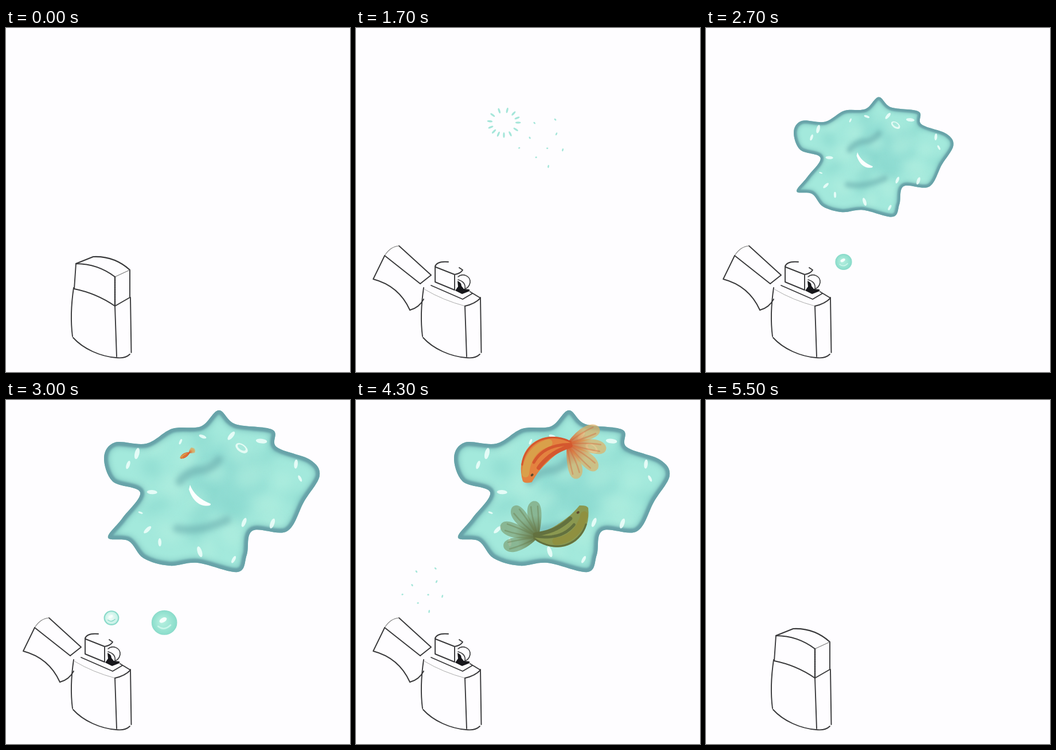
These frames come from a looping animation (600x600 px, 5700 ms). An HTML page with a canvas:

```html
<!DOCTYPE html>
<html lang="en">
<head>
<meta charset="utf-8">
<title>Lighter and fish</title>
<style>
html, body { margin: 0; width: 100%; height: 100%; overflow: hidden; background: #fefdff; }
canvas { display: block; width: 100vmin; height: 100vmin; }
</style>
</head>
<body>
<canvas id="stage" width="600" height="600"></canvas>
<script>
const ctx = document.getElementById('stage').getContext('2d');
const LOOP = 5700, TAU = Math.PI * 2, RAD = Math.PI / 180;
const PAPER = '#fefdff', INK = '#39393b', MINT = '#a5e6da';

const mix = (a, b, q) => a + (b - a) * q;
const clamp = v => Math.max(0, Math.min(1, v));

// Pictures change six times a second, snapped to tenths.
const frameAt = ms => Math.floor(Math.floor(ms / 100) * .6 + .2);
const timeOf = frame => Math.round(frame * 5 / 3) * 100;

function seeded(seed) {
  return () => (seed = seed * 16807 % 2147483647) / 2147483647;
}

function line(d, width = 1.9, color = INK) {
  ctx.strokeStyle = color;
  ctx.lineWidth = width;
  ctx.stroke(new Path2D(d));
}

function shape(d, color) {
  ctx.fillStyle = color;
  ctx.fill(new Path2D(d));
}

function oval(x, y, rx, ry, rot, color) {
  ctx.beginPath();
  ctx.ellipse(x, y, rx, ry, rot, 0, TAU);
  ctx.fillStyle = color;
  ctx.fill();
}

// ---- lighter ----
const HINGE = [118, 472], SWING = 55 * RAD;
// Lid corners: shut x, y, then open x, y.
const LID = {
  A: [122, 411, 30, 438], B: [152, 399, 60, 381], C: [216, 422, 75, 380], D: [190, 434, 50, 397],
  E: [190, 485, 112, 446], F: [119, 455, 94, 492], G: [216, 470, 131, 431]
};

function spin(x, y, a) {
  const c = Math.cos(a), s = Math.sin(a);
  return [x * c - y * s, x * s + y * c];
}

function lidPoint([x, y, openX, openY], q) {
  const [hx, hy] = HINGE;
  const [rx, ry] = spin(openX - hx, openY - hy, SWING);
  const p = spin(mix(x - hx, rx, q), mix(y - hy, ry, q), -SWING * q);
  return [p[0] + hx, p[1] + hy];
}

// Quadratic segment from a to b, bowed sideways.
function bow(a, b, bulge) {
  const dx = b[0] - a[0], dy = b[1] - a[1], k = 2 * bulge / Math.hypot(dx, dy);
  return `Q${(a[0] + b[0]) / 2 + dy * k} ${(a[1] + b[1]) / 2 - dx * k} ${b}`;
}

function lid(q) {
  const [A, B, C, D, E, F, G] = Object.values(LID).map(p => lidPoint(p, q));
  const top = bow(A, D, 6 * (1 - q)), left = bow(F, A, -10 * q), seam = bow(E, F, -4);
  const back = bow(B, C, mix(7, 1, q));
  shape(`M${A}${top}L${E}${seam}${left}`, PAPER);
  shape(`M${D}L${C}L${G}L${E}Z`, PAPER);
  shape(`M${A}L${B}${back}L${D}Z`, PAPER);
  line(`M${F}${left}${top}`);
  line(`M${C}L${G}L${E}`);
  if (q < 1) line(`M${E}${seam}`);
  if (q < .5) line(`M${A}L${B}${back}`, 2.2);
  line(q < .5 ? `M${D}L${C}` : `M${D}Q${B} ${C}`, 1.1, '#777');
  ctx.setLineDash(q ? [] : [3, 1.2]);
  line(`M${D}L${E}`, q ? 1.9 : 2.4);
  ctx.setLineDash([]);
}

function lighter(q) {
  line('M190 485L193 573M217 470L218.500 566');
  line('M117 540C135 560 165 573 192 575Q208 577 216 569');
  line('M118 453Q111 500 116 538');
  if (q) {
    line('M120 456Q152 475 190 485', 1, '#aaa');
    line('M131 449L186 473L203 463M190 485Q208 481 217 471L199 460');
  }
  if (q > .3) {
    line('M138 416C140 409 150 407 161 408M138 415V443L172 457V430L139 417M172 430Q183 428 186 422L180 418');
    line('M178 434C186 427 200 432 199 444Q197 453 190 455Q192 443 178 439', 1.6);
    shape('M177 441Q184 444 184 450L188 455L198 456V459L185 464L173 458L178 451Z', '#17171b');
  }
  lid(q);
  if (q === 1) line('M94 492Q110 488 118 473');
}

const lidAt = t => t < 4500 ? clamp(t / 700) : Math.min(.72, (5500 - t) / 1000 * (t < 5500));

// ---- water cloud ----
const MIDDLE = [359, 159];
const EDGE = [
  [171, 100], [190, 74], [245, 76], [290, 50], [340, 46], [371, 18], [400, 42], [465, 52],
  [472, 82], [530, 104], [547, 132], [520, 177], [490, 229], [430, 228], [420, 270], [404, 300],
  [334, 284], [285, 289], [240, 276], [214, 246], [178, 240], [203, 206], [234, 161], [186, 142]
];

// Smooth closed curve through all points.
function loopThrough(pts) {
  const n = pts.length, p = new Path2D(), get = i => pts[(i + n) % n];
  p.moveTo(...pts[0]);
  for (let i = 0; i < n; i++) {
    const [a, b, c, d] = [get(i - 1), get(i), get(i + 1), get(i + 2)];
    p.bezierCurveTo(b[0] + (c[0] - a[0]) / 6, b[1] + (c[1] - a[1]) / 6,
      c[0] - (d[0] - b[0]) / 6, c[1] - (d[1] - b[1]) / 6, ...c);
  }
  p.closePath();
  return p;
}
const edge = loopThrough(EDGE);

function rim(width, color) {
  ctx.strokeStyle = color;
  ctx.lineWidth = width;
  ctx.stroke(edge);
}

function cloud(t) {
  const k = Math.pow(clamp((t - 1950) / 850), 2.4);
  const rnd = seeded(77);
  const soft = px => { ctx.filter = `blur(${(px * k).toFixed(2)}px)`; };
  const [mx, my] = MIDDLE;
  ctx.save();
  ctx.translate(mix(175, mx, Math.pow(k, 1.5)), mix(413, my, k));
  ctx.scale(k, k);
  ctx.translate(-mx, -my);
  ctx.clip(edge);
  ctx.fillStyle = k < .2 ? '#7fd6c2' : '#a3e9dc';
  ctx.fill(edge);

  // Mottled water, lighter toward the rim.
  soft(9);
  oval(385, 140, 70, 60, .4, '#92ded4');
  for (let i = 0; i < 22; i++) {
    const a = i * 2.4, d = Math.sqrt(i / 22);
    oval(mx + 165 * d * Math.cos(a), my + 110 * d * Math.sin(a),
      15 + 22 * rnd(), 10 + 12 * rnd(), a, i % 3 ? '#b4f0e080' : '#85d6cc80');
  }
  soft(5);
  line('M303 142Q318 122 345 122Q362 116 371 104', 15, '#67a9ab90');
  line('M298 224Q335 232 386 209', 14, '#67a9ab88');
  rim(18, '#68abad90');
  soft(1.5);
  rim(k < .2 ? 22 : 14, '#68a3a9');

  soft(.7);
  EDGE.forEach(([x, y], i) => {
    const d = .76 + .1 * rnd(), size = 4 + 6 * rnd();
    if (i % 3 < 2) oval(mix(mx, x, d), mix(my, y, d), size, size * .4, rnd() * 3, '#f1fffbd8');
  });
  if (t < 4000) shape('M321 148Q329 170 357 181Q358 186 344 184Q327 180 319 156Z', '#fbfffe');
  oval(411, 84, 12, 7, .6, '#e4fbf4');
  oval(411, 83, 8, 4, .6, '#a8e9dc');
  ctx.restore();
}

// ---- fish ----
const ORANGE = { body: '#e3823f', edge: '#d4582f', belly: '#d9a04a', tail: '#e0b062b0' };
const GREEN = { body: '#8a9850', edge: '#63713f', belly: '#8f9040', tail: '#7fa378b8' };

// Each circles the middle while growing; push and turn bend the path halfway.
const FISH = [
  { colors: ORANGE, start: 3000, from: 239, sweep: -352, push: -25, turn: 0, size: 18 },
  { colors: GREEN, start: 3300, from: 61, sweep: -344, push: 21, turn: -45, size: 24 }
];

function swim({ colors, start, from, sweep, push, turn, size }, t) {
  const p = (t - start) / (4300 - start);
  if (p < 0 || p > 1) return;
  const q = Math.pow(p, 1.5), wave = Math.sin(Math.PI * p);
  const angle = from + sweep * q, radius = 74 + push * wave;
  ctx.save();
  ctx.translate(350 + radius * Math.cos(angle * RAD), 160 + radius * Math.sin(angle * RAD));
  ctx.rotate((angle - 90 + turn * wave - 18 * q) * RAD);
  const s = mix(size, 100, q);
  ctx.scale(s, s);
  ctx.filter = `blur(${s / 130}px)`;
  fish(colors, .47 * q * q);
  ctx.restore();
}

function fin(c, x, y, a, len, wide) {
  ctx.save();
  ctx.translate(x, y);
  ctx.rotate(a);
  const g = ctx.createLinearGradient(0, 0, len, 0);
  g.addColorStop(0, c.edge);
  g.addColorStop(.6, c.tail);
  ctx.fillStyle = g;
  ctx.beginPath();
  ctx.moveTo(0, 0);
  ctx.bezierCurveTo(len * .4, -wide, len * .9, -wide * 1.3, len, -wide * .3);
  ctx.bezierCurveTo(len * 1.05, wide * .9, len * .5, wide * .6, 0, 0);
  ctx.fill();
  ctx.globalAlpha = .35;
  for (const k of [-.5, .2]) {
    ctx.beginPath();
    ctx.moveTo(0, 0);
    ctx.quadraticCurveTo(len * .5, wide * k, len * .85, wide * k);
    ctx.strokeStyle = c.edge;
    ctx.lineWidth = .025;
    ctx.stroke();
  }
  ctx.restore();
}

// Unit fish: spine runs from the head (u = 0) to the tail root (u = 1).
function fish(c, bend) {
  const side = (u, k) => {
    const v = 1 - u, slope = 2 * bend * (1 - 2 * u), len = Math.hypot(1, slope);
    const girth = .21 * Math.pow(Math.sin(Math.PI * (.08 + .89 * u)), .7) * k;
    return [
      .5 * (v * v - u * u) - slope / len * girth,
      bend * (u * v - (v * v + u * u) / 2) - girth / len
    ];
  };
  const along = (from, to, k) => {
    for (let i = 0; i <= 20; i++) ctx.lineTo(...side(mix(from, to, i / 20), k));
  };
  const streak = (color, width, from, to, k) => {
    ctx.beginPath();
    along(from, to, k);
    ctx.strokeStyle = color;
    ctx.lineWidth = width;
    ctx.stroke();
  };

  const back = Math.atan2(-bend, -.5), root = side(.95, 0);
  for (let i = -1.5; i < 2; i++) {
    const a = back + (i * (14 + bend * 40) + bend * 50) * RAD;
    fin(c, ...root, a, .72 - .06 * Math.abs(i), .17);
  }
  for (const k of [-1, 1]) fin(c, ...side(.35, k * .8), Math.PI + k * -.95, .27, .08);

  ctx.beginPath();
  along(0, 1, 1);
  along(1, 0, -1);
  ctx.quadraticCurveTo(.56, -bend / 2, ...side(0, 1));
  ctx.fillStyle = c.body;
  ctx.fill();
  streak(c.belly, .13, .1, .7, -.4);
  streak(c.edge, .05, .3, 1, .1);
  streak(c.edge, .07, .25, 1, .75);
  streak(c.edge, .03, .2, 1, -.9);
  oval(...side(.1, .5), .028, .02, 0, '#5d4a30');
}

// ---- bubbles ----
// Each rises from one place to another (x, y, radius), then bursts.
const BUBBLES = [
  { start: 700, end: 1500, from: [212, 385, 9], to: [325, 197, 24] },
  { start: 1000, end: 1800, from: [204, 318, 12], to: [258, 165, 19] },
  { start: 2700, end: 3700, from: [240, 408, 14], to: [324, 362, 32] },
  { start: 2800, end: 4200, from: [184, 398, 9], to: [118, 328, 22], drift: 4, hollow: true }
];

function ball(x, y, r, hollow) {
  const g = ctx.createRadialGradient(x - r * .2, y - r * .1, r * .1, x, y, r);
  g.addColorStop(0, hollow ? '#f0fcf8' : '#b4efdf');
  g.addColorStop(1, hollow ? '#c2f0e5' : '#8addcb');
  oval(x, y, r, r * .96, 0, g);
  ctx.strokeStyle = '#8adaca';
  ctx.lineWidth = hollow ? 2.2 : 1.2;
  ctx.stroke();
  oval(x - r * .1, y - r * .2, r * .32, r * .18, -.5, '#f6fffc');
  line(`M${x - r * .5} ${y + r * .3}q${r * .5} ${r * .4} ${r} ${-r * .1}`, r * .12, hollow ? '#8adaca' : '#c9f5e9');
}

function petals(x, y, rx, ry, n, size) {
  for (let i = 0; i < n; i++) {
    const a = (i + .3 * Math.sin(i * 7)) / n * TAU;
    oval(x + rx * Math.cos(a), y + ry * Math.sin(a), 8 * size, 2.8 * size, a, MINT);
  }
}

function drops(x, y, rx, ry, size) {
  for (let i = 0; i < 9; i++) {
    const a = i * 2.4 + 1, d = Math.sqrt((i + 1) / 9);
    oval(x + rx * d * Math.cos(a), y + ry * d * Math.sin(a), size * (1 + i % 3 * .3), size * .8, i, MINT);
  }
}

function bubble({ start, end, from, to, drift = .7, hollow }, t) {
  const [x, y, r] = to, late = frameAt(t) - frameAt(end);
  if (t < start || late > 1) return;
  if (late === 1) return drops(x, y, r * 2, r * 1.9, 1.7);
  if (late === 0) return petals(x, y, r * 1.3, r * 1.15, 13, r / 32);
  const q = (t - start) / (end - start), rise = Math.pow(q, .7);
  ball(mix(from[0], x, Math.pow(q, drift)), mix(from[1], y, rise), mix(from[2], r, rise), hollow);
}

function draw(t) {
  ctx.fillStyle = PAPER;
  ctx.fillRect(0, 0, 600, 600);
  ctx.lineCap = ctx.lineJoin = 'round';
  lighter(lidAt(t));
  if (t >= 2000 && t <= 4500) cloud(t);
  FISH.forEach(f => swim(f, t));
  BUBBLES.forEach(b => bubble(b, t));
  if (t === 4700) petals(347, 169, 188, 148, 26, 2);
  if (t === 4800) drops(347, 169, 195, 155, 6);
}

let shown = -1;
function tick() {
  const t = timeOf(frameAt(performance.now() % LOOP));
  if (t !== shown) draw(shown = t);
  requestAnimationFrame(tick);
}
tick();
</script>
</body>
</html>
```
